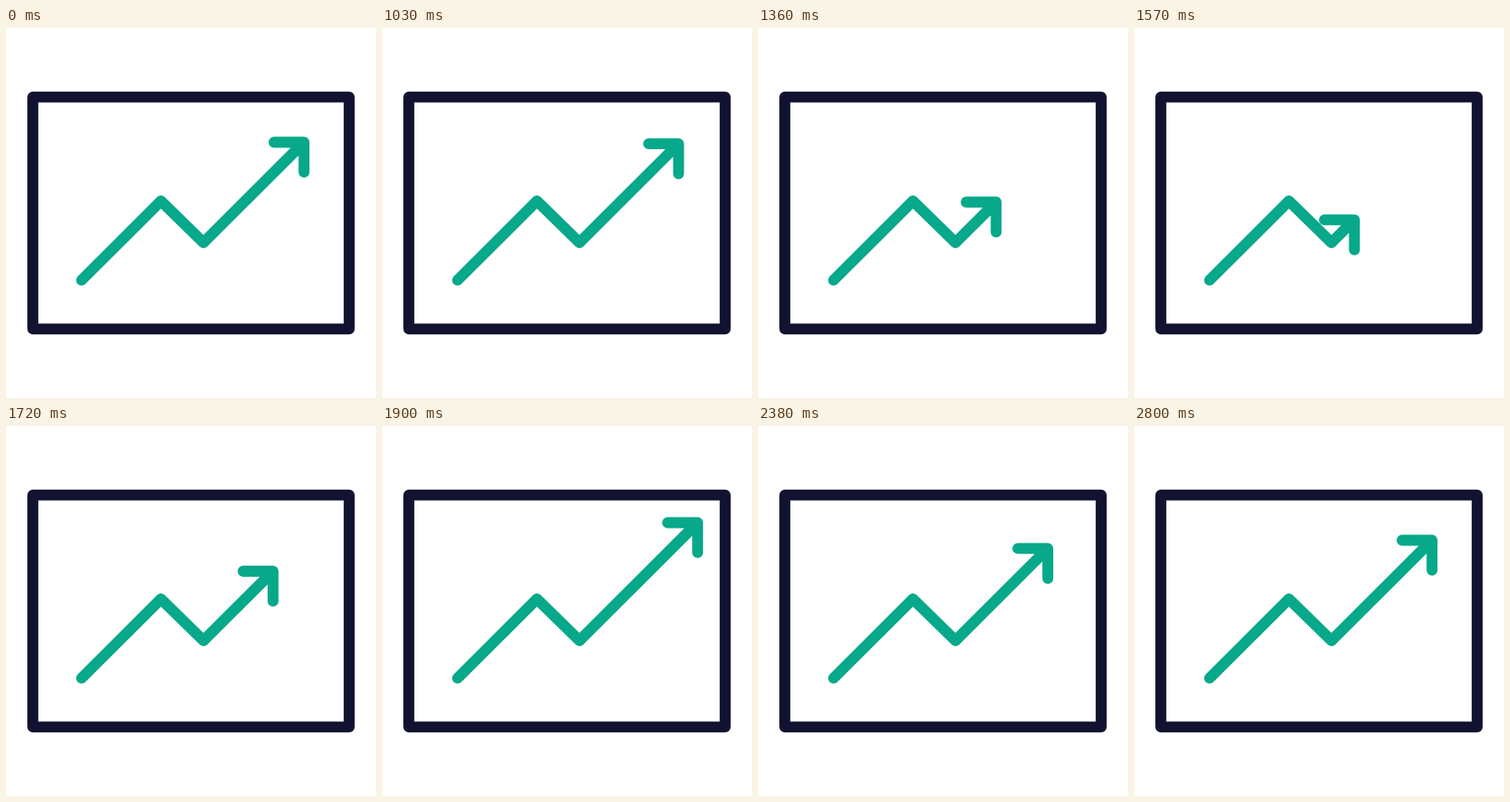
An HTML page for the animation above (2.83 s loop, 400 px wide and 400 px high).

```html
<!DOCTYPE html>
<html lang="en">
<head>
<meta charset="utf-8">
<title>Rising trend</title>
<style>
html, body { margin: 0; width: 100%; height: 100%; overflow: hidden; background: #fff; }
svg { display: block; width: 100%; height: 100%; }
</style>
</head>
<body>
<svg viewBox="0 0 400 400" fill="none" stroke-width="11.8" stroke-linecap="round" stroke-linejoin="round">
  <rect x="29" y="74.7" width="342" height="250.6" stroke="#121331"/>
  <path id="trend" stroke="#08a88a"/>
</svg>
<script>
const LOOP = 2830, REST = 1000, STEP = 30;
// [time in ms, distance the tip is pulled back along the diagonal]
const keys = [[985, 0], [1540, 86], [1900, -19], [2350, 9], [2800, 0]];
const trend = document.getElementById("trend");
const ease = s => s * s * (3 - 2 * s);

function pullAt(time) {
  const t = REST + Math.floor((time - REST) / STEP) * STEP;
  if (t <= REST) return 0;
  const i = keys.findIndex(key => t <= key[0]);
  if (i < 0) return 0;
  const [t0, a] = keys[i - 1], [t1, b] = keys[i];
  return a + (b - a) * ease((t - t0) / (t1 - t0));
}

function draw(now) {
  const d = pullAt(now % LOOP);
  const x = 322.2 - d, y = 123.5 + d;
  trend.setAttribute("d",
    `M81.7 272.7L167.5 187L213.5 232L${x} ${y}M${x - 32.4} ${y}h32.4v32.4`);
  requestAnimationFrame(draw);
}
draw(0);
</script>
</body>
</html>
```
